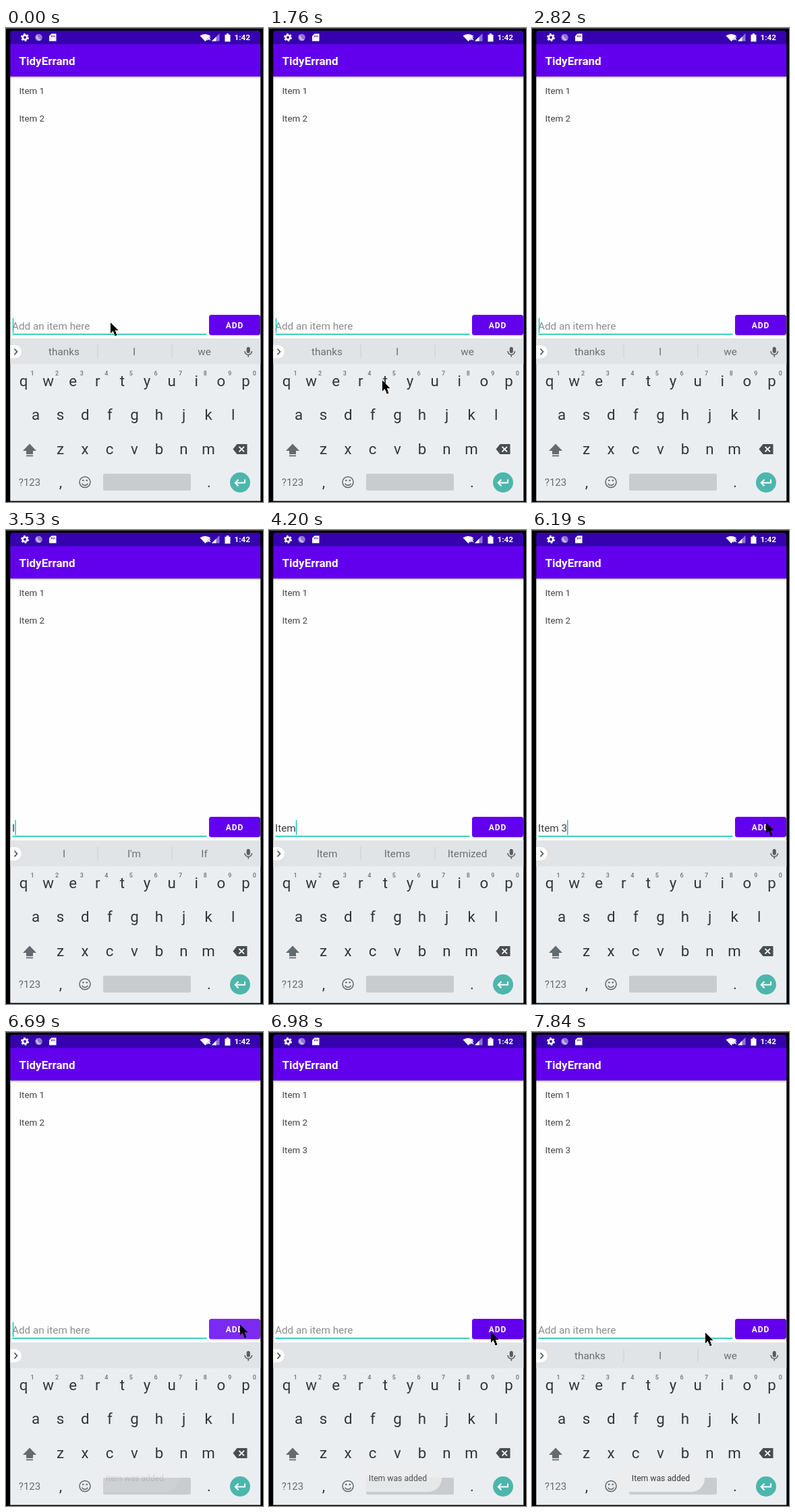
An HTML page for the animation above (7.99 s loop, 381 px wide and 704 px high).

```html
<!DOCTYPE html>
<html lang="en">
<head>
<meta charset="utf-8">
<title>List demo</title>
<style>
  html, body { margin: 0; width: 100%; height: 100%; overflow: hidden; background: #000; }
  svg { display: block; width: 100vw; height: 100vh; }
  text { font-family: Roboto, "Open Sans", sans-serif; white-space: pre; }
  .screen { filter: blur(.5px); }
  .mid { text-anchor: middle; }
  .item { font-size: 13.3px; fill: #444; }
  .key { font-size: 22.3px; fill: #30373b; }
  .hint { font-size: 9px; font-weight: 500; fill: #6a7074; }
  .word { font-size: 15.3px; fill: #6a7074; }
  .field { font-size: 15.3px; }
</style>
</head>
<body>
<svg viewBox="0 0 381 704" preserveAspectRatio="none">
  <defs>
    <linearGradient id="shade" x2="0" y2="1">
      <stop stop-color="#000" stop-opacity=".3"/>
      <stop offset="1" stop-color="#000" stop-opacity="0"/>
    </linearGradient>
  </defs>
  <rect width="381" height="704" fill="#000"/>
  <rect width="381" height="1" fill="#555"/>
  <g class="screen">
    <path d="M6.300 24V8q0-4 4-4H373q4 0 4 4V24Z" fill="#3602b0"/>
    <rect x="6.300" y="24" width="371" height="48" fill="#6200ee"/>
    <rect x="6.300" y="72" width="371" height="390" fill="#fefefe"/>
    <rect x="6.300" y="72" width="371" height="3" fill="url(#shade)"/>

    <!-- status bar -->
    <g fill="#fff">
      <circle cx="28" cy="14" r="3.300" fill="none" stroke="#fff" stroke-width="2.600"/>
      <circle cx="28" cy="14" r="5.200" fill="none" stroke="#fff" stroke-width="1.700" stroke-dasharray="2.700 2.745"/>
      <circle cx="48.500" cy="14" r="5.300" fill="#8f76d2"/>
      <path d="M46 10a5 5 0 0 0 6.500 7.500Q47 16 46 10Z" fill="#c9bdea"/>
      <path d="M67.500 8.500H74.500V19.500H64V12Z"/>
      <path d="M67.500 11v2.500M69.700 11v2.500M71.900 11v2.500" stroke="#3602b0"/>
      <path d="M287.500 11.500Q295 6.500 303 11.500L295.500 20Z"/>
      <path d="M298.500 13.500l4.500 4.500M303 13.500l-4.500 4.500" stroke="#fff" stroke-width="1.300"/>
      <path d="M316.500 8V19.500H305Z" fill="#8e74d4"/>
      <path d="M311.500 13V19.500H305Z"/>
      <path d="M324.500 10h2.300V8.300h3.400V10h2.300V20.300h-8Z"/>
      <text x="338.500" y="18" font-size="11.800" font-weight="700">1:42</text>
    </g>

    <text x="19.500" y="55" font-size="17" font-weight="700" fill="#fff">TidyErrand</text>
    <text class="item" x="19.500" y="98">Item 1</text>
    <text class="item" x="19.500" y="139">Item 2</text>
    <text class="item" id="added" x="19.500" y="180">Item 3</text>

    <!-- entry row -->
    <text class="field" id="entry" x="9" y="448"></text>
    <rect x="9.500" y="454" width="288" height="1.700" fill="#15cbb8"/>
    <rect id="caret" y="431" width="1.500" height="22" fill="#15cbb8"/>
    <rect x="301" y="427.500" width="76" height="30" rx="4" fill="#000" opacity=".18"/>
    <rect id="button" x="301" y="426" width="76" height="30" rx="3.500"/>
    <text class="mid" x="339" y="445.700" font-size="12" font-weight="700" letter-spacing="1" fill="#fff">ADD</text>

    <!-- keyboard -->
    <rect x="6.300" y="461" width="371" height="241.500" fill="#ebeef1"/>
    <rect x="6.300" y="461" width="371" height="38.500" fill="#e1e4e6"/>
    <path d="M6.300 471H13a9.800 9.800 0 0 1 0 19.600H6.300Z" fill="#fff"/>
    <path d="M12.500 476.500l4 4.300-4 4.300" fill="none" stroke="#50575b" stroke-width="1.700"/>
    <g id="words">
      <path d="M136 470.500v20M246 470.500v20" stroke="#cacecf"/>
      <text class="word mid" x="86" y="486"></text>
      <text class="word mid" x="190" y="486"></text>
      <text class="word mid" x="294" y="486"></text>
    </g>
    <g stroke="#565d61" fill="none" stroke-width="1.600">
      <rect x="357.500" y="474.500" width="3.500" height="7.500" rx="1.750" fill="#565d61"/>
      <path d="M354 480a5.200 5.200 0 0 0 10.500 0M359.250 485.500v3"/>
    </g>
    <g id="keys"></g>
    <g fill="#646b6f">
      <path d="M35 617.500L45 628H40V633H30V628H25Z"/>
      <rect x="30" y="634.500" width="10" height="1.800"/>
      <path d="M342.500 618H357.500V633H342.500L336.500 625.500Z" fill="#474e52"/>
      <path d="M345.500 621.800l7.500 7.500M353 621.800l-7.500 7.500" stroke="#fff" stroke-width="1.800"/>
      <text class="mid" x="35" y="680" font-size="15">?123</text>
      <circle cx="117" cy="674.500" r="8" fill="none" stroke="#5f666a" stroke-width="1.500"/>
      <circle cx="114.300" cy="672" r="1.300"/>
      <circle cx="119.700" cy="672" r="1.300"/>
      <path d="M112.700 676.500a4.700 4.700 0 0 0 8.600 0" fill="none" stroke="#5f666a" stroke-width="1.400"/>
    </g>
    <text class="key mid" x="81" y="682">,</text>
    <text class="key mid" x="301" y="682">.</text>
    <rect x="144" y="662" width="130" height="25" rx="2" fill="#c9cccf"/>
    <circle cx="347" cy="675" r="15" fill="#4db6ac"/>
    <path d="M354 670.500v5H340M344.500 670.700l-4.700 4.800 4.700 4.800" fill="none" stroke="#fff" stroke-width="2"/>

    <g id="toast">
      <rect x="127" y="643" width="129" height="40" rx="20" fill="#ebedee"/>
      <text class="mid" x="191" y="667" font-size="12.200" fill="#3c3c3c">Item was added</text>
    </g>
  </g>
  <path id="mouse" d="M0 0V16L3.700 13 6.800 20.500 9.500 19.300 6.600 12H11.500Z" fill="#000" shape-rendering="crispEdges"/>
</svg>
<script>
const LOOP = 7990;
const $ = id => document.getElementById(id);
const svgNS = 'http://www.w3.org/2000/svg';
const letters = [];

function addKey(x, y, label, className) {
  const node = document.createElementNS(svgNS, 'text');
  node.setAttribute('x', x);
  node.setAttribute('y', y);
  node.setAttribute('class', className + ' mid');
  node.textContent = label;
  $('keys').append(node);
  return node;
}

[['qwertyuiop', 26, 531.5], ['asdfghjkl', 44, 582], ['zxcvbnm', 80.5, 633]].forEach(([row, left, y], r) => {
  [...row].forEach((letter, i) => {
    const x = left + i * 36.6;
    letters.push(addKey(x, y, letter, 'key'));
    if (r === 0) addKey(x + 13, 515.5, (i + 1) % 10, 'hint');
  });
});

// Each step overrides part of the state from its time on.
const common = ['thanks', 'I', 'we'];
const steps = [
  [0, { mouse: [155, 437], caret: 1, text: '', words: common, caps: 0, press: 0, toast: 0, added: 0 }],
  [380, { caret: 0 }],
  [770, { caret: 1 }],
  [1030, { mouse: null }],
  [1310, { caret: 0 }],
  [1760, { caret: 1, mouse: [168, 523] }],
  [1880, { mouse: [200, 661] }],
  [2000, { mouse: null }],
  [2280, { caret: 0 }],
  [2820, { caret: 1 }],
  [3400, { caret: 0, caps: 1 }],
  [3530, { caret: 1, caps: 0, text: 'I', words: ['I', "I'm", 'If'] }],
  [3650, { text: 'It', words: ['It', "It's", 'Its'] }],
  [3770, { text: 'Ite', words: ['Ite', 'Item', 'Items'] }],
  [4200, { text: 'Item', words: ['Item', 'Items', 'Itemized'] }],
  [4320, { text: 'Item ', words: ['is', 'number', 'of'] }],
  [4730, { caret: 0 }],
  [5000, { mouse: [297, 585] }],
  [5150, { caret: 1, text: 'Item 3', words: null, mouse: [342, 487] }],
  [5270, { mouse: [358, 410] }],
  [5420, { mouse: [359, 404] }],
  [5540, { mouse: [353, 414], caret: 0 }],
  [5660, { mouse: [347, 425] }],
  [5810, { mouse: [347, 434] }],
  [6070, { caret: 1 }],
  [6320, { press: .5 }],
  [6440, { press: 1, text: '' }],
  [6690, { toast: .15 }],
  [6820, { toast: .5, added: 1 }],
  [6980, { toast: .85, press: 0, caret: 0, mouse: [329, 445] }],
  [7120, { toast: 1, words: common, mouse: [297, 450] }],
  [7240, { mouse: [268, 447] }],
  [7370, { caret: 1, mouse: [257, 446] }],
  [7840, { caret: 0 }]
];

const caretAt = { '': 9.8, 'I': 13.3, 'It': 18.3, 'Ite': 26.3, 'Item': 39.8, 'Item ': 43.6, 'Item 3': 52 };
const wordNodes = $('words').querySelectorAll('text');
const show = (node, on) => node.setAttribute('visibility', on ? 'visible' : 'hidden');

function draw(state) {
  $('entry').textContent = state.text || 'Add an item here';
  $('entry').setAttribute('fill', state.text ? '#3c3c3c' : '#8c8c8c');
  $('caret').setAttribute('x', caretAt[state.text]);
  show($('caret'), state.caret);
  show($('words'), state.words);
  wordNodes.forEach((node, i) => node.textContent = state.words ? state.words[i] : '');
  letters.forEach(node => {
    const label = node.textContent;
    node.textContent = state.caps ? label.toUpperCase() : label.toLowerCase();
  });
  $('button').setAttribute('fill', `rgb(${98 + 25 * state.press},${43 * state.press},${238 + 4 * state.press})`);
  $('toast').setAttribute('opacity', state.toast);
  show($('added'), state.added);
  show($('mouse'), state.mouse);
  if (state.mouse) $('mouse').setAttribute('transform', `translate(${state.mouse})`);
}

const start = performance.now();
let shown = -1;
function tick() {
  const time = (performance.now() - start) % LOOP;
  const past = steps.filter(([at]) => at <= time);
  if (past.length !== shown) {
    shown = past.length;
    draw(Object.assign({}, ...past.map(step => step[1])));
  }
  requestAnimationFrame(tick);
}
tick();
</script>
</body>
</html>
```
